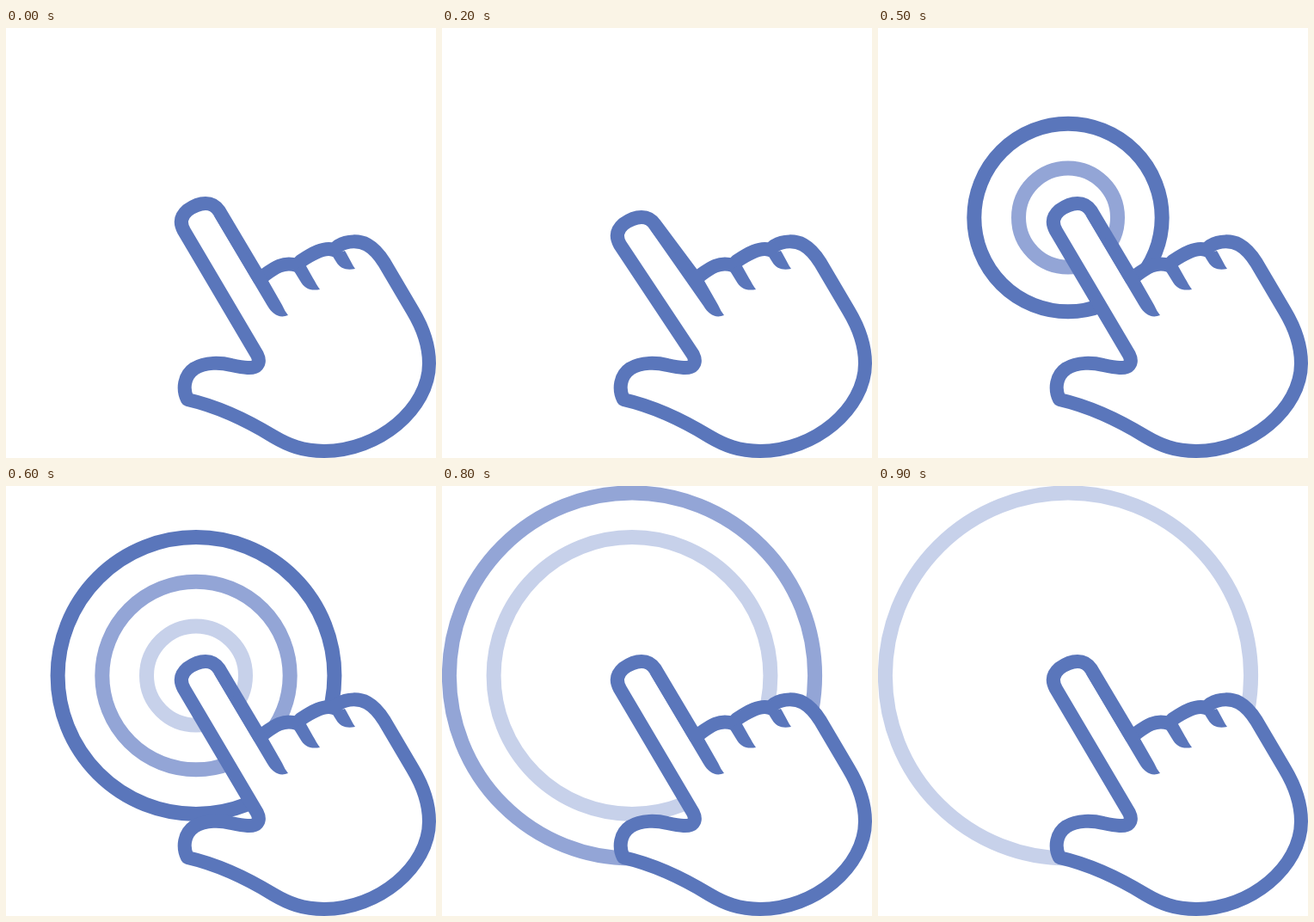
An HTML page for the animation above (1000 ms loop, 500x500 px).

```html
<!DOCTYPE html>
<html lang="en">
<head>
<meta charset="utf-8">
<title>Tap gesture</title>
<style>
  html, body { margin: 0; width: 100%; height: 100%; overflow: hidden; background: #fff; }
  svg { display: block; width: 500px; height: 500px; }
  .ring { fill: none; stroke-width: 17; opacity: 0; }
  .hand { fill: #fff; stroke: #5a76bb; stroke-width: 16; stroke-linejoin: round; }
  .folds { fill: #5a76bb; }
</style>
</head>
<body>
<svg viewBox="0 0 500 500"></svg>
<script>
const SHADES = ['#5a76bb', '#93a5d6', '#c7d1ea'];
const STEPS = 10;
const LOOP = 1000;
const FIRST_RING = 4;
const stage = document.querySelector('svg');

function add(parent, tag, attrs) {
  const el = document.createElementNS('http://www.w3.org/2000/svg', tag);
  for (const key in attrs) el.setAttribute(key, attrs[key]);
  return parent.appendChild(el);
}

// Holds one style per tenth of the loop, without blending.
function hold(el, styleAt) {
  const frames = [];
  for (let n = 0; n <= STEPS; n++) {
    frames.push({ offset: n / STEPS, easing: 'step-end', ...styleAt(n % STEPS) });
  }
  el.animate(frames, { duration: LOOP, iterations: Infinity }).startTime = 0;
}

// dy lowers the fingertip while the base of the finger stays put.
function outline(dy) {
  const y = v => v + dy;
  return `M292 380L207 ${y(236)}
    C202 ${y(227)} 203 ${y(219)} 211 ${y(212)}
    C218 ${y(207)} 226 ${y(204)} 232 ${y(204)}
    C239 ${y(204)} 244 ${y(207)} 248 ${y(213)}
    L295 292L301 287C312 279 323 271 338 276
    L343 271C355 263 370 254 381 258
    L387 253C397 247 411 247 420 252C429 257 435 265 440 273
    L473 329C485 349 492 369 492 390C492 443 433 492 370 492
    C345 492 328 485 311 475C280 456 246 440 211 432
    C205 420 207 404 219 396C232 388 250 389 262 392
    C276 395 288 397 292 392C295 388 294 384 292 380Z`;
}

function folds(dy) {
  return `M241 ${217 + dy}L301 287L321 322Q324 329 328 334C318 338 310 333 304 323Z
    M334 281L342 294C347 303 354 306 365 304C362 300 360 296 357 291L348 275Z
    M379 264L384 272C389 280 396 282 406 280C403 276 400 269 394 259Z`;
}

function addHand(dy) {
  const hand = add(stage, 'g', {});
  add(hand, 'path', { class: 'hand', d: outline(dy) });
  add(hand, 'path', { class: 'folds', d: folds(dy) });
  return hand;
}

for (let i = 0; i < 4; i++) {
  const ring = add(stage, 'circle', { class: 'ring', cx: 221, cy: 220.5, r: 57.5 + 51.7 * i });
  hold(ring, n => {
    const shade = SHADES[n - FIRST_RING - i];
    return { opacity: shade ? 1 : 0, stroke: shade || SHADES[0] };
  });
}

const isPressed = n => n === 2 || n === 3;
hold(addHand(0), n => ({ opacity: isPressed(n) ? 0 : 1 }));
hold(addHand(16), n => ({ opacity: isPressed(n) ? 1 : 0 }));
</script>
</body>
</html>
```
